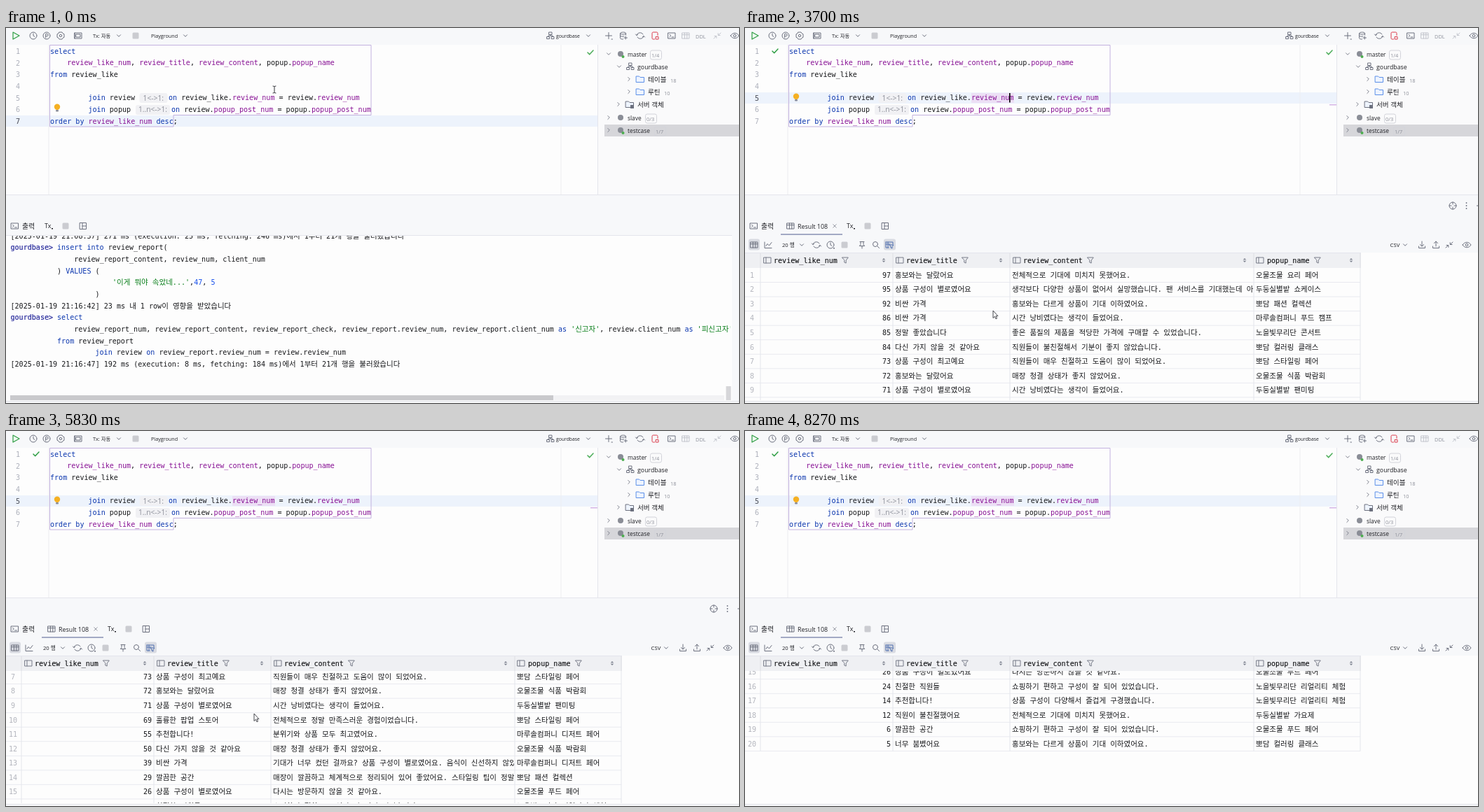
Animation, 1046 px wide and 536 px high, one loop 8.3 s. Source, as an HTML page:

```html
<!DOCTYPE html>
<html lang="ko">
<head>
<meta charset="utf-8">
<title>Query console</title>
<style>
html,body{margin:0;width:100%;height:100%;overflow:hidden;background:#f7f8fa}
svg{display:block;width:100vw;height:100vh}
text{white-space:pre}
.m{font:10.07px "DejaVu Sans Mono","Noto Sans CJK KR",monospace;fill:#16171a}
.m .h{font:10.5px "Noto Sans CJK KR","Noto Sans CJK",sans-serif}
.u{font-family:"Open Sans","Noto Sans CJK KR","Noto Sans CJK",sans-serif;fill:#202126}
.k{fill:#0a35ae}.c{fill:#871094}.s{fill:#067d17}.n{fill:#1750eb}
.i{fill:none;stroke-width:1;stroke-linecap:round;stroke-linejoin:round}
</style>
</head>
<body>
<svg id="stage" viewBox="0 0 1046 536" preserveAspectRatio="none"></svg>
<script>
const LOOP = 8300, INK = '#6c707e', DIM = '#c3c5cd', RED = '#db3b4b', GREEN = '#2f9e44';
const PANEL = '#f7f8fa', PAPER = '#fdfdfd', LINE = '#e4e5ec';
const DB = 'gourdbase';

// Drawing helpers
const esc = s => s.replace(/&/g, '&amp;').replace(/</g, '&lt;').replace(/>/g, '&gt;');
const hangul = s => String(s).replace(/[가-힣]+/g, m => `<tspan class="h">${m}</tspan>`);
const rect = (x, y, w, h, fill, rx = 0) => `<rect x="${x}" y="${y}" width="${w}" height="${h}" fill="${fill}" rx="${rx}"/>`;
const ui = (x, y, s, size = 8.8, fill = '#202126', more = '') =>
  `<text class="u" x="${x}" y="${y}" font-size="${size}" style="fill:${fill}" ${more}>${esc(s)}</text>`;
const mono = (x, y, html, more = '') => `<text class="m" x="${x}" y="${y}" ${more}>${hangul(html)}</text>`;
const group = (id, body, more = '') => `<g id="${id}" ${more}>${body}</g>`;

const KEYS = /^(select|from|join|on|order|by|desc|insert|into|VALUES|as)$/;
function paint(s, cols) {
  return s.replace(/'[^']*'?|\w+/g, w => {
    const cls = w[0] === "'" ? 's' : KEYS.test(w) ? 'k' : /^\d+$/.test(w) ? 'n'
      : cols && /_(num|title|content|name)$/.test(w) ? 'c' : '';
    return cls ? `<tspan class="${cls}">${w}</tspan>` : w;
  });
}

// Icon paths, centred on 0,0
const ICONS = {
  play: 'M-4-5L5 0L-4 5Z',
  clock: 'M5 0A5 5 0 1 1-5 0A5 5 0 1 1 5 0M0-3V0L2 1.5',
  param: 'M5 0A5 5 0 1 1-5 0A5 5 0 1 1 5 0M-1.3 3V-2.6H.6A1.6 1.6 0 0 1 .6 .6H-1.3',
  gear: 'M-2-5H2L3-3.4L5-2.2V2.2L3 3.4L2 5H-2L-3 3.4L-5 2.2V-2.2L-3-3.4ZM1.7 0A1.7 1.7 0 1 1-1.7 0A1.7 1.7 0 1 1 1.7 0',
  pane: 'M-5-4H5V4H-5ZM-3-2H3V2H-3ZM-5-4V4',
  down: 'M-2.5-1.2L0 1.3L2.5-1.2',
  right: 'M-1.2-2.5L1.3 0L-1.2 2.5',
  schema: 'M-2-5H2V-1.5H-2ZM-5 1.5H-1.5V4.5H-5ZM1.5 1.5H5V4.5H1.5ZM0-1.5V0M-3.2 1.5V0H3.2V1.5',
  plus: 'M-4.5 0H4.5M0-4.5V4.5M4 5H5.5',
  base: 'M-4.5-3.5C-4.5-5.5 3.5-5.5 3.5-3.5S-4.5-1.5-4.5-3.5V3.5C-4.5 5-1 5-.5 5M-4.5 0C-4 1.5 0 1.5 1 .7M3.5-3.5V-1M1 3H5.5M3.2 1V5',
  refresh: 'M-5-.5C-4.5-5 2.5-5.5 4-2M5 .5C4.5 5-2.5 5.5-4 2M-6.5-2L-5-.3L-3.3-2M6.5 2L5 .3L3.3 2',
  corner: 'M4-.5V-3.5Q4-5 2.5-5H-2.5Q-4-5-4-3.5V3.5Q-4 5-2.5 5H-.5M1.5 1.5H5V5H1.5Z',
  console: 'M-5-4H5V4H-5ZM-3-1.8L-1.2 0L-3 1.8M0 2H3',
  table: 'M-5-4H5V4H-5ZM-5-1.3H5M-1.6-4V4M1.8-4V4',
  jump: 'M-5 4L-1.5 .7M-4 .5H-1.2V3.3M5-4L1.5-.7M4-.5H1.2V-3.3',
  eye: 'M-6 0C-3-5 3-5 6 0C3 5-3 5-6 0M1.8 0A1.8 1.8 0 1 1-1.8 0A1.8 1.8 0 1 1 1.8 0',
  layout: 'M-4.5-4.5H4.5V4.5H-4.5ZM-1-4.5V4.5M-1 0H4.5',
  chart: 'M-5-4V4.5H5M-3 1.5L-1-1.5L1.5 1L5-3.5',
  pin: 'M-3-4.5H3M-2-4.5V-.5L-3.7 1.5H3.7L2-.5V-4.5M0 1.5V5',
  find: 'M2.5-1A3.5 3.5 0 1 1-4.5-1A3.5 3.5 0 1 1 2.5-1M1.6 1.6L4.6 4.6',
  filter: 'M-5-4H5V-1M-5-4V4H-1M-5-1H1M-2-4V4M0 0H6L4 2.5V5L2 4V2.5Z',
  load: 'M0-5V2M-2.6-.5L0 2L2.6-.5M-4.5 2V4.5H4.5V2',
  save: 'M0 2V-5M-2.6-2.4L0-5L2.6-2.4M-4.5 2V4.5H4.5V2',
  funnel: 'M-4.3-4H4.3L1.2 0V4L-1.2 3V0Z',
  column: 'M-5-4H5V4H-5ZM-2-4V4',
  sort: 'M-1.6-1L0-2.7L1.6-1ZM-1.6 1L0 2.7L1.6 1Z',
  folder: 'M-5.5-4H-1.5L0-2.5H5.5V4.5H-5.5Z',
  check: 'M-4 0L-1.3 2.8L4-3',
  close: 'M-2.3-2.3L2.3 2.3M-2.3 2.3L2.3-2.3',
  target: 'M5 0A5 5 0 1 1-5 0A5 5 0 1 1 5 0M0-5V-2M0 5V2M-5 0H-2M5 0H2',
  beam: 'M-2-5Q0-5 0-4Q0-5 2-5M0-4V4M-2 5Q0 5 0 4Q0 5 2 5'
};
const icon = (name, x, y, color = INK, w = 1, fill = 'none') =>
  `<path class="i" d="${ICONS[name]}" transform="translate(${x} ${y})" style="stroke:${color};stroke-width:${w};fill:${fill}"/>`;
const row = (y, list) => list.map(([n, x, c]) => icon(n, x, y, c)).join('');
const stopOff = (x, y) => rect(x - 4.5, y - 4.5, 9, 9, '#cbccd1', 1.5);
const stopOn = (x, y) => `<rect x="${x - 4.5}" y="${y - 4.5}" width="9" height="9" rx="1.5" fill="#fff3f3" stroke="${RED}"/>`;
const tx = (x, c) => ui(x, 286, 'Tx', 9, c) + rect(x + 10, 286, 2, 1.5, c);

function toolbar() {
  return rect(0, 0, 1046, 24, PANEL) + icon('play', 14, 11, GREEN, 1.2, '#f0faf2')
    + row(11, [['clock', 39], ['param', 58], ['gear', 78], ['pane', 103], ['down', 161], ['down', 256],
      ['schema', 777], ['down', 831], ['plus', 860], ['base', 881], ['refresh', 905], ['corner', 926, RED],
      ['console', 950], ['table', 970, DIM], ['jump', 1015, DIM], ['eye', 1040]])
    + ui(207, 14, 'Playground', 7.2) + ui(785, 14, DB, 6.8) + ui(984, 14.5, 'DDL', 7.4, '#8d909b')
    + group('txOn', ui(124, 14, 'Tx: 자동', 7.4) + stopOff(185, 11))
    + group('txOff', ui(124, 14, 'Tx: 자동', 7.4, '#b5b7c0') + stopOn(185, 11));
}

const lineY = n => 33.2 + (n - 1) * 16.72;
function editor() {
  const code = [[63, 1, 'select'], [87.2, 2, 'review_like_num, review_title, review_content, popup.popup_name'],
    [63, 3, 'from review_like'], [117.5, 5, 'join review'], [232, 5, 'on review_like.review_num = review.review_num'],
    [117.5, 6, 'join popup'], [236, 6, 'on review.popup_post_num = popup.popup_post_num'],
    [63, 7, 'order by review_like_num desc;']];
  const lineNo = (n, fill) => mono(17, lineY(n) + 3.6, n, `text-anchor="middle" style="fill:${fill}"`);
  let s = rect(0, 24, 844, 214, PAPER) + group('band', rect(0, 0, 844, 16, '#edf3fc'))
    + rect(60.5, 24, 1, 214, '#ebecf0') + rect(791.5, 24, 1, 214, '#ededf1')
    + group('usage', rect(323, 93, 61, 14, '#ecdff5') + rect(834, 109, 10, 1.5, '#d4b4e6'))
    + '<path d="M62.5 24.5H521V124.5H239V141H62.5Z" fill="none" stroke="#c3b2df"/>';
  for (let n = 1; n < 8; n++) s += lineNo(n, '#adb0bb');
  s += group('numOld', lineNo(7, '#555863')) + group('numNew', lineNo(5, '#555863'));
  for (const [x, n, c] of code) s += mono(x, lineY(n) + 3.4, paint(c, true));
  s += rect(190.5, 93, 40, 14, '#f1f1f4', 3) + ui(195.5, 103.5, '1<->1:', 10.3, '#8c8f99')
    + rect(185, 110, 49, 14, '#f1f1f4', 3) + ui(189, 120, '1..n<->1:', 10.2, '#8c8f99');
  s += icon('check', 834, 35, '#4fae5c', 1.6) + group('done', icon('check', 43, 33, GREEN, 1.5));
  s += group('bulb', '<circle r="4.2" cy="-1.2" fill="#f5b022"/>' + rect(-2, 3, 4, 2.6, '#8b8d96', 1));
  return s + group('caret', rect(377, 93, 1.6, 13.5, '#000'));
}

function tree() {
  const items = [[38, 860, 'down', 'seal', 887, 'master', '1/4', 921, 8.4], [56, 875, 'down', 'schema', 901, DB, '', 0, 8.8],
    [74, 889, 'right', 'folder', 916, '테이블', '18', 948, 9.6], [92, 889, 'right', 'folder', 916, '루틴', '10', 939, 9.6],
    [110, 874, 'right', 'folder', 901, '서버 객체', '', 0, 9.6], [129, 860, 'right', 'seal', 887, 'slave', '0/3', 914, 8.4],
    [147, 860, 'right', 'seal', 887, 'testcase', '1/7', 927, 8.4]];
  let s = rect(844, 0, 1, 238, LINE) + rect(845, 24, 201, 214, '#fafafb') + rect(854, 138, 192, 17, '#d6d6da');
  for (const [y, ax, arrow, kind, x, label, tag, tagX, size] of items) {
    s += icon(arrow, ax, y - 1, '#80838f') + ui(x, y + 3.2, label, size);
    if (kind === 'seal') {
      s += `<circle cx="877" cy="${y - 1}" r="4" fill="#8a8d96"/>`;
      if (label !== 'slave') s += `<circle cx="880.5" cy="${y + 3}" r="2" fill="#4cae4f"/>`;
    } else if (kind === 'schema') s += icon(kind, 891, y - 1);
    else s += icon(kind, x - 11, y - 1, x > 910 ? '#5b8fe8' : INK, 1, '#eef4ff');
    if (tag.includes('/')) s += `<rect x="${tagX - 1.5}" y="${y - 6}" width="16" height="13" rx="2.5" fill="none" stroke="#d3d4da"/>`;
    if (tag) s += ui(tagX, y + 3.6, tag, 7.4, '#8c8f99');
  }
  return s + rect(891, 110, 5, 5, INK);
}

function output() {
  const y = n => 300.6 + n * 16.67;
  const stamp = (n, s) => mono(6.5, y(n), '[2025-01-19 ' + s);
  const fetched = (a, b, c) => `${a} ms (execution: ${b} ms, fetching: ${c} ms)에서 1부터 21개 행을 불러왔습니다`;
  const prompt = n => mono(6.5, y(n), DB + '&gt;', 'style="fill:#24279a;stroke:#24279a;stroke-width:.2"');
  const sql = [[73, 1, 'insert into review_report('], [97.3, 2, 'review_report_content, review_num, client_num'],
    [73, 3, ') VALUES ('], [152, 4, "'이게 뭐야 속았네...',47, 5"], [127.5, 5, ')'], [73, 7, 'select'],
    [97.3, 8, "review_report_num, review_report_content, review_report_check, review_report.review_num, review_report.client_num as '신고자', review.client_num as '피신고자'"],
    [73, 9, 'from review_report'], [127.5, 10, 'join review on review_report.review_num = review.review_num']];
  return rect(0, 296, 1036, 237, PAPER) + rect(0, 296, 1036, 1, LINE)
    + '<g clip-path="url(#logBox)">' + stamp(0, '21:08:37] ' + fetched(271, 25, 246)) + prompt(1) + prompt(7)
    + sql.map(([x, n, c]) => mono(x, y(n), paint(c, false))).join('')
    + stamp(6, '21:16:42] 23 ms 내 1 row이 영향을 받았습니다') + stamp(11, '21:16:47] ' + fetched(192, 8, 184)) + '</g>'
    + rect(6, 525, 1019, 7, '#f2f2f4') + rect(6, 525, 775, 7, '#c9c9cc') + rect(1027.5, 512, 7, 20, '#d6d6d9')
    + tx(55, '#202126') + stopOff(85, 283) + icon('layout', 110, 283);
}

const SHOPS = ['오물조물', '두둥실별밭', '뽀담', '마루솔컴퍼니', '노을빛무리단'];
const TITLES = ['홍보와는 달랐어요', '상품 구성이 별로였어요', '비싼 가격', '정말 좋았습니다', '다신 가지 않을 것 같아요',
  '상품 구성이 최고예요', '훌륭한 팝업 스토어', '추천합니다!', '깔끔한 공간', '친절한 직원들', '직원이 불친절했어요', '너무 붐볐어요'];
const NOTES = ['전체적으로 기대에 미치지 못했어요.', '생각보다 다양한 상품이 없어서 실망했습니다. 팬 서비스를 기대했는데 아쉬웠어요.',
  '홍보와는 다르게 상품이 기대 이하였어요.', '시간 낭비였다는 생각이 들었어요.', '좋은 품질의 제품을 적당한 가격에 구매할 수 있었습니다.',
  '직원들이 불친절해서 기분이 좋지 않았습니다.', '직원들이 매우 친절하고 도움이 많이 되었어요.', '매장 청결 상태가 좋지 않았어요.',
  '전체적으로 정말 만족스러운 경험이었습니다.', '분위기와 상품 모두 최고였어요.',
  '기대가 너무 컸던 걸까요? 상품 구성이 별로였어요. 음식이 신선하지 않았어요.',
  '매장이 깔끔하고 체계적으로 정리되어 있어 좋았어요. 스타일링 팁이 정말 좋았어요.', '다시는 방문하지 않을 것 같아요.',
  '쇼핑하기 편하고 구성이 잘 되어 있었습니다.', '상품 구성이 다양해서 즐겁게 구경했습니다.'];
// likes, title, note, shop, event
const ROWS = `97 0 0 0 요리 페어|95 1 1 1 쇼케이스|92 2 2 2 패션 컬렉션|86 2 3 3 푸드 캠프|85 3 4 4 콘서트|84 4 5 2 컬러링 클래스|73 5 6 2 스타일링 페어|72 0 7 0 식품 박람회|71 1 3 1 팬미팅|69 6 8 2 스타일링 페어|55 7 9 3 디저트 페어|50 4 7 0 식품 박람회|39 2 10 3 디저트 페어|29 8 11 2 패션 컬렉션|26 1 12 0 푸드 페어|24 9 13 4 리얼리티 체험|14 7 14 4 리얼리티 체험|12 10 0 1 가요제|6 8 13 0 푸드 페어|5 11 2 2 컬러링 클래스`
  .split('|').map(r => r.split(' '));
const ROW_H = 20.55, EDGES = [22, 211, 378, 726, 878];

function grid() {
  let body = '';
  ROWS.forEach(([likes, title, note, shop, ...event], i) => {
    const y = 353 + i * ROW_H, b = y + 3.8;
    body += rect(0, y + 10, 878, 1, '#e9eaf0') + mono(10, b, i + 1, 'text-anchor="middle" style="fill:#b3b5bd"')
      + mono(208, b, likes, 'text-anchor="end"') + mono(214, b, TITLES[title])
      + mono(381, b, NOTES[note], 'clip-path="url(#noteBox)"') + mono(729, b, SHOPS[shop] + ' ' + event.join(' '));
  });
  for (const x of EDGES) body += rect(x - .5, 343, 1, 20 * ROW_H, '#e4e5eb');
  let s = rect(0, 321, 1046, 212, PAPER) + `<g clip-path="url(#gridBox)">${group('rows', body)}</g>`
    + rect(0, 321, 879, 22, '#eff0f3') + rect(0, 321, 879, 1, LINE);
  const heads = [['review_like_num', 32, 41, 143, 198], ['review_title', 221, 230, 314, 365],
    ['review_content', 388, 397, 493, 713], ['popup_name', 735, 745, 817, 865]];
  for (const [name, ix, x, fx, sx] of heads)
    s += icon('column', ix, 332, '#777b88') + mono(x, 335.7, name, 'style="stroke:#16171a;stroke-width:.15"')
      + icon('funnel', fx, 332, '#777b88') + icon('sort', sx, 332, '#777b88', .4, '#777b88');
  for (const x of EDGES) s += rect(x - .5, 322, 1, 21, '#dddee4');
  return s;
}

function results() {
  // dx is the extra room taken by the row counter while loading
  const tools = (dx, color) => icon('refresh', 102 + dx, 310, color) + icon('clock', 122 + dx, 310) + rect(126 + dx, 314, 2, 1.5, INK)
    + icon('pin', 167 + dx, 310) + icon('find', 187 + dx, 310) + rect(198 + dx, 301.5, 17, 16, '#d9dbe2', 3)
    + icon('filter', 206 + dx, 310, '#4f6fae') + icon('load', 966, 310, color) + icon('save', 986, 310, color);
  let ticks = '';
  for (let i = 0; i < 8; i++)
    ticks += `<rect x="-1" y="-9" width="2.2" height="5" rx="1" fill="#777a83" opacity="${(.2 + i * .08).toFixed(2)}" transform="rotate(${i * 45})"/>`;
  return grid() + icon('table', 65, 283) + ui(75, 286.8, 'Result 108', 8.9)
    + rect(5, 301.5, 16, 16, '#d9dbe2', 3) + row(310, [['table', 13], ['chart', 33], ['down', 942], ['jump', 1005], ['eye', 1030]])
    + ui(920.5, 313, 'CSV', 7.8)
    + group('busy', rect(51, 294, 77, 2, '#a3a9c4') + tx(133, DIM) + stopOn(163, 283) + icon('layout', 187, 283)
      + ui(53, 313, '0 행', 7.6, '#9a9da8') + icon('down', 75, 310, DIM) + ui(86.5, 313, '0+', 7.8)
      + tools(12, DIM) + stopOn(154, 310) + group('spin', ticks))
    + group('idle', rect(51, 294, 88, 2, '#a3a9c4') + icon('close', 128, 283, '#9a9da8') + tx(145, '#202126') + stopOff(175, 283)
      + icon('layout', 200, 283) + ui(53, 313, '20 행', 7.6) + icon('down', 81, 310) + tools(0, INK) + stopOff(142, 310));
}

const stage = document.getElementById('stage');
const clip = (id, x, y, w, h) => `<clipPath id="${id}">${rect(x, y, w, h, '#000')}</clipPath>`;
stage.innerHTML = '<defs>' + clip('logBox', 0, 297, 1034, 227) + clip('gridBox', 0, 343, 879, 189) + clip('noteBox', 379, 340, 346, 430) + '</defs>'
  + rect(0, 0, 1046, 536, PANEL) + editor() + tree() + toolbar() + rect(0, 238, 1046, 1, LINE)
  + icon('console', 12.5, 283) + ui(23, 286.8, '출력', 9.8, '#202126', 'font-weight="500"')
  + group('log', output()) + group('result', results()) + rect(0, 533, 1046, 1, '#e2e3e8')
  + group('hover', icon('target', 1010, 254) + [250, 254, 258].map(y => `<circle cx="1029.5" cy="${y}" r=".9" fill="${INK}"/>`).join('') + rect(1044, 253.5, 2, 1, INK))
  + group('beam', icon('beam', 0, 0, '#33343a'))
  + group('arrow', '<path d="M0-5V5.5L2.4 3.3L4 6.8L5.6 6L4 2.7H7Z" fill="#fff" stroke="#33343a" stroke-width=".9"/>');

const el = {};
stage.querySelectorAll('g[id]').forEach(g => el[g.id] = g);
const show = (id, on) => { el[id].style.display = on ? '' : 'none'; };
const move = (id, x, y) => el[id].setAttribute('transform', `translate(${x.toFixed(2)} ${y.toFixed(2)})`);

// Value at time t along [time, ...values] stops
function along(stops, t, ease = p => p) {
  if (t <= stops[0][0]) return stops[0].slice(1);
  for (let i = 1; i < stops.length; i++) {
    const a = stops[i - 1], b = stops[i];
    if (t <= b[0]) {
      const p = ease((t - a[0]) / (b[0] - a[0]));
      return a.slice(1).map((v, j) => v + (b[j + 1] - v) * p);
    }
  }
  return stops[stops.length - 1].slice(1);
}
const smooth = p => p * p * (3 - 2 * p);

const CLICK = 290, RUN = 2000, SHOWN = 2150, DONE = 2480, BULB = 2900;
const POINTER = [[0, 383, 88], [450, 383, 88], [1050, 609, 91], [2650, 609, 91], [3500, 354, 409], [6980, 354, 409], [7650, 1000, -25]];
const SCROLL = [[4885, 0], [4930, 6], [5470, 82.5], [6230, 172.5], [6630, 264], [6830, 296.5]];

function render(t) {
  const clicked = t >= CLICK, running = t >= RUN && t < DONE, ready = t >= SHOWN;
  move('band', 0, clicked ? 92 : 125);
  show('numOld', !clicked);
  show('numNew', clicked);
  show('usage', t >= CLICK + 200);
  show('caret', clicked && (t - CLICK) % 1000 < 500);
  show('bulb', !clicked || t >= BULB);
  move('bulb', 73, clicked ? 99 : 114);
  show('done', t >= DONE);
  show('txOn', !running);
  show('txOff', running);
  show('log', !ready);
  show('result', ready);
  show('busy', running);
  show('idle', !running);
  el.spin.setAttribute('transform', `translate(531 414) rotate(${Math.floor(t / 100) * 45})`);
  move('rows', 0, -along(SCROLL, t)[0]);

  const [x, y] = along(POINTER, t, smooth);
  const typing = y < 238 && y > 24 && x < 844;
  show('beam', typing);
  show('arrow', !typing && y > -10);
  move('beam', x, y);
  move('arrow', x, y);
  show('hover', t > 3000 && t < 7690);
}

const start = performance.now();
function tick() {
  render((performance.now() - start) % LOOP);
  requestAnimationFrame(tick);
}
tick();
</script>
</body>
</html>
```
